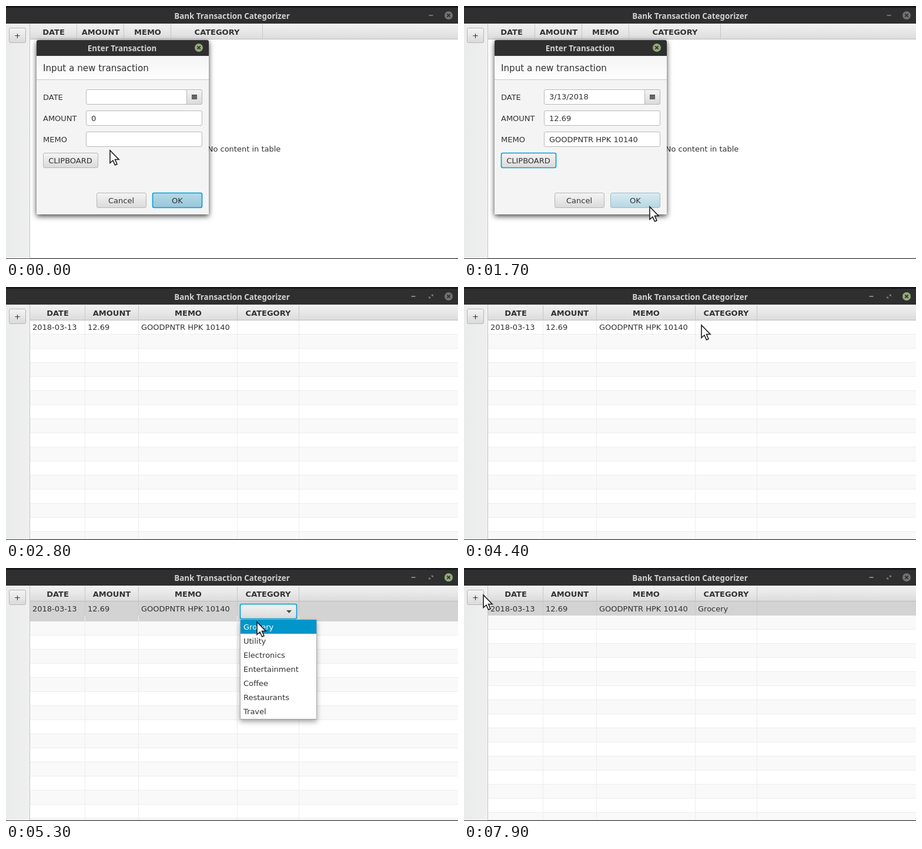
Recreate the animation shown at these times as an HTML page. Size 769 by 431 pixels, loop 8000 ms.

```html
<!DOCTYPE html>
<html lang="en">
<head>
<meta charset="utf-8">
<title>Bank Transaction Categorizer</title>
<style>
  html, body { margin: 0; width: 100%; height: 100%; overflow: hidden; background: #fff; }
  svg { display: block; width: 769px; height: 431px; font: 13px "DejaVu Sans", sans-serif; }
  text { fill: #323232; white-space: pre; }
  .mid { text-anchor: middle; }
  .head text { font-weight: bold; text-anchor: middle; }
  .title { font: bold 13.33px "Noto Sans", sans-serif; fill: #d2d2d2; text-anchor: middle; }
  .box { fill: #fff; stroke: #b9b9b9; }
  .btn { fill: url(#btn); stroke: #b6b6b6; }
  .ring { fill: none; stroke: #039ed3; stroke-width: 1.6; }
  .lines { stroke: #ededed; fill: none; }

  /* Every change is a hard cut; 1.25% is 100 ms. */
  .t { animation: 8s step-end -1ms infinite; }
  .before { animation-name: before; }
  .after { animation-name: after; }
  .empty { animation-name: empty; }
  .filled { animation-name: filled; }
  .clipFocus { animation-name: clipFocus; }
  .okFocus { animation-name: okFocus; }
  .active { animation-name: active; }
  .grid { animation-name: grid; }
  .row { animation-name: row; }
  .cells { animation-name: cells; }
  .cells text { fill: currentColor; }
  .focus { animation-name: focus; }
  .chosen { animation-name: chosen; }
  .combo { animation-name: combo; }
  .comboFocus { animation-name: comboFocus; }
  .popup { animation-name: popup; }
  .cursor { animation-name: cursor; }

  @keyframes before { 0% { opacity: 1 } 26.25%, 100% { opacity: 0 } }
  @keyframes after { 0% { opacity: 0 } 26.25%, 100% { opacity: 1 } }
  @keyframes empty { 0% { opacity: 1 } 8.75%, 100% { opacity: 0 } }
  @keyframes filled { 0% { opacity: 0 } 8.75%, 100% { opacity: 1 } }
  @keyframes clipFocus { 0%, 22.5%, 100% { opacity: 0 } 8.75% { opacity: 1 } }
  @keyframes okFocus { 0%, 22.5%, 100% { opacity: 1 } 8.75% { opacity: 0 } }
  @keyframes active { 0%, 86.25%, 100% { opacity: 0 } 51.25% { opacity: 1 } }
  @keyframes focus { 0%, 61.25%, 86.25%, 100% { opacity: 0 } 56.25%, 67.5% { opacity: 1 } }
  @keyframes chosen { 0% { opacity: 0 } 67.5%, 100% { opacity: 1 } }
  @keyframes combo { 0%, 67.5%, 100% { opacity: 0 } 58.75% { opacity: 1 } }
  @keyframes comboFocus { 0% { opacity: 0 } 61.25%, 100% { opacity: 1 } }
  @keyframes popup { 0%, 67.5%, 100% { opacity: 0 } 62.5% { opacity: 1 } }
  @keyframes grid {
    0%, 67.5%, 100% { transform: translateY(0) }
    58.75% { transform: translateY(10px) }
  }
  @keyframes row {
    0% { fill: #fff; height: 23px }
    56.25% { fill: #0096c9; height: 24px }
    58.75% { fill: #0096c9; height: 34px }
    61.25% { fill: #d3d3d3; height: 34px }
    67.5% { fill: #0096c9; height: 24px }
    86.25%, 100% { fill: #d3d3d3; height: 24px }
  }
  @keyframes cells {
    0% { color: #323232; transform: translateY(0) }
    56.25%, 67.5% { color: #fff; transform: translateY(1px) }
    61.25%, 86.25%, 100% { color: #323232; transform: translateY(1px) }
  }
  @keyframes cursor {
    0% { transform: translate(176px, 245px) }
    1.25% { transform: translate(148px, 256px) }
    2.5% { transform: translate(96px, 280px) }
    3.75% { transform: translate(72px, 271px) }
    10% { transform: translate(78px, 272px) }
    11.25% { transform: translate(104px, 277px) }
    12.5% { transform: translate(152px, 288px) }
    13.75% { transform: translate(212px, 305px) }
    15% { transform: translate(268px, 322px) }
    16.25% { transform: translate(310px, 335px) }
    17.5% { transform: translate(331px, 340px) }
    18.75% { transform: translate(336px, 341px) }
    21.25% { transform: translate(315px, 341px) }
    27.5% { transform: translate(313px, 340px) }
    28.75% { transform: translate(307px, 338px) }
    30% { transform: translate(302px, 336px) }
    32.5% { transform: translate(190px, 220px) }
    33.75% { transform: translate(15px, 47px) }
    35% { transform: translate(-40px, 60px) }
    41.25% { transform: translate(8px, 74px) }
    42.5% { transform: translate(189px, 70px) }
    46.25% { transform: translate(330px, 55px) }
    47.5% { transform: translate(404px, 63px) }
    51.25% { transform: translate(403px, 64px) }
    61.25% { transform: translate(412px, 69px) }
    63.75% { transform: translate(419px, 76px) }
    65% { transform: translate(424px, 86px) }
    66.25% { transform: translate(426px, 91px) }
    71.25% { transform: translate(120px, 120px) }
    72.5% { transform: translate(-40px, 124px) }
    93.75% { transform: translate(0, 27px) }
    95% { transform: translate(35px, 42px) }
    97.5% { transform: translate(33px, 43px) }
    98.75%, 100% { transform: translate(32px, 45px) }
  }
</style>
</head>
<body>
<svg viewBox="0 0 769 431">
  <defs>
    <linearGradient id="btn" x2="0" y2="1"><stop stop-color="#f4f4f4"/><stop offset="1" stop-color="#dadada"/></linearGradient>
    <linearGradient id="headFill" x2="0" y2="1"><stop stop-color="#f3f3f3"/><stop offset="1" stop-color="#dcdcdc"/></linearGradient>
    <linearGradient id="side"><stop stop-color="#eaeceb"/><stop offset="1" stop-color="#efefef"/></linearGradient>
    <linearGradient id="panel" x2="0" y2="1"><stop stop-color="#f4f4f4"/><stop offset="1" stop-color="#fefefe"/></linearGradient>
    <linearGradient id="okPale" x2="0" y2="1"><stop stop-color="#d9ecf3"/><stop offset="1" stop-color="#b7d6e2"/></linearGradient>
    <linearGradient id="okBlue" x2="0" y2="1"><stop stop-color="#b4dae9"/><stop offset="1" stop-color="#98c6da"/></linearGradient>
    <pattern id="stripes" y="81" width="769" height="48" patternUnits="userSpaceOnUse">
      <path fill="#fff" d="M0 0h769v48H0z"/>
      <path fill="#f9f9f9" d="M0 0h769v24H0z"/>
      <path fill="#ededed" d="M0 23h769v1H0zM0 47h769v1H0z"/>
    </pattern>
    <filter id="shadow" x="-20%" y="-20%" width="140%" height="140%">
      <feDropShadow dx="0" dy="3" stdDeviation="5" flood-opacity=".75"/>
    </filter>
    <filter id="soft" x="-20%" y="-20%" width="140%" height="140%">
      <feDropShadow dx="0" dy="4" stdDeviation="4" flood-opacity=".35"/>
    </filter>
    <g id="close">
      <circle r="7"/>
      <path d="M-2.7-2.7l5.4 5.4m0-5.4l-5.4 5.4" stroke="#2f2f2f" stroke-width="1.7"/>
    </g>
  </defs>

  <!-- window -->
  <path fill="#17181d" d="M0 0h769v4H0z"/>
  <path fill="#2f2f2f" d="M0 3h769v27H0z"/>
  <text class="title" x="384.5" y="22">Bank Transaction Categorizer</text>
  <use href="#close" x="753" y="16" fill="#727272"/>
  <use class="t active" href="#close" x="753" y="16" fill="#93ab7a"/>
  <path fill="url(#side)" d="M0 30h40v400H0z"/>
  <rect class="btn" x="5.5" y="37.5" width="28" height="25" rx="2.5"/>
  <text class="mid" x="19.5" y="55">+</text>
  <path fill="#fff" d="M40 30h729v400H40z"/>
  <path fill="url(#headFill)" d="M41 30h728v26H41z"/>
  <path fill="#bcbcbc" d="M41 56h728v1H41z"/>

  <!-- empty table -->
  <g class="t before">
    <path d="M719.5 16h7" stroke="#858585" stroke-width="1.6"/>
    <path d="M120.5 31v25M200.5 31v25M280.5 31v25M436.5 31v25" stroke="#c6c6c6"/>
    <g class="head">
      <text x="81" y="49">DATE</text>
      <text x="161" y="49">AMOUNT</text>
      <text x="241" y="49">MEMO</text>
      <text x="359" y="49">CATEGORY</text>
    </g>
    <text class="mid" x="405" y="248">No content in table</text>
  </g>

  <!-- table with the entry -->
  <g class="t after">
    <path d="M689.5 16h7" stroke="#9a9a9a" stroke-width="1.6"/>
    <path d="M723.5 13h3v3zM722.5 19h-3v-3zM724 15.500l2-2M722 16.500l-2 2" fill="#858585" stroke="#858585" stroke-width=".6"/>
    <path d="M134.500 31v25M225.500 31v25M393.500 31v25M498.500 31v25" stroke="#c6c6c6"/>
    <g class="head">
      <text x="88" y="49">DATE</text>
      <text x="180" y="49">AMOUNT</text>
      <text x="310" y="49">MEMO</text>
      <text x="446" y="49">CATEGORY</text>
    </g>
    <path class="lines" d="M41 80.500h728"/>
    <rect class="t grid" x="41" y="81" width="728" height="349" fill="url(#stripes)"/>
    <rect class="t row" x="41" y="57" width="728" height="23"/>
    <path class="lines" d="M134.500 81v349M225.500 81v349M393.500 81v349M498.500 81v349"/>
    <path d="M134.500 57v24M225.500 57v24M393.500 57v24M498.500 57v24" stroke="#aaa" stroke-opacity=".25"/>
    <g class="t focus">
      <rect x="42.500" y="58.500" width="725" height="21" fill="none" stroke="#58bbdd" stroke-opacity=".7"/>
    </g>
    <g class="t cells">
      <text x="45" y="73">2018-03-13</text>
      <text x="139" y="73">12.69</text>
      <text x="230" y="73">GOODPNTR HPK 10140</text>
      <text class="t chosen" x="398" y="73">Grocery</text>
    </g>
  </g>

  <!-- table frame -->
  <path d="M40.500 30v400M40 429.500h729" stroke="#c4c4c4"/>
  <path class="t focus" d="M40.500 30.500h728v399h-728z" fill="none" stroke="#039ed3"/>
  <path fill="#34363b" d="M0 430h769v1H0z"/>

  <!-- category picker -->
  <g class="t combo">
    <rect class="btn" x="398.500" y="61.500" width="96" height="25" rx="2.500"/>
    <rect class="ring t comboFocus" x="398.500" y="61.500" width="96" height="25" rx="2.500"/>
    <path fill="#4b4b4b" d="M477 72h9l-4.500 5z"/>
  </g>
  <g class="t popup">
    <path d="M398.500 88.500h130v169h-130z" fill="#fff" stroke="#aaa" filter="url(#soft)"/>
    <path fill="#0096c9" d="M399 88h129v24H399z"/>
    <text x="404" y="105" style="fill:#fff">Grocery</text>
    <text x="404" y="129">Utility</text>
    <text x="404" y="153">Electronics</text>
    <text x="404" y="177">Entertainment</text>
    <text x="404" y="201">Coffee</text>
    <text x="404" y="225">Restaurants</text>
    <text x="404" y="249">Travel</text>
  </g>

  <!-- entry dialog -->
  <g class="t before">
    <path d="M52 355V61q0-3 3-3h287q3 0 3 3v294z" fill="#f4f4f4" filter="url(#shadow)"/>
    <path d="M52 85V61q0-3 3-3h287q3 0 3 3v24z" fill="#2f2f2f"/>
    <text class="title" x="197.500" y="77">Enter Transaction</text>
    <use href="#close" x="328" y="71" fill="#93ab7a"/>
    <path fill="url(#panel)" d="M52 85h293v40H52z"/>
    <path fill="#c6c6c6" d="M52 125h293v1H52z"/>
    <text x="63" y="111" font-size="15.170">Input a new transaction</text>
    <text x="63" y="160">DATE</text>
    <text x="63" y="196">AMOUNT</text>
    <text x="63" y="232">MEMO</text>

    <rect class="box" x="136.500" y="142.500" width="197" height="25" rx="2.500"/>
    <path class="btn" d="M307.500 142.500h23.500q2.500 0 2.500 2.500v20q0 2.500-2.500 2.500h-23.500z"/>
    <path fill="#505050" d="M316 151h9v8h-9z"/>
    <path d="M317 153.500h7M317 155.500h7M317 157.500h7" stroke="#bbb" stroke-width=".8" stroke-dasharray="1 1"/>
    <rect class="box" x="136.500" y="178.500" width="197" height="25" rx="2.500"/>
    <rect class="box" x="136.500" y="214.500" width="197" height="25" rx="2.500"/>
    <text class="t empty" x="145" y="196">0</text>
    <g class="t filled">
      <text x="145" y="159">3/13/2018</text>
      <text x="145" y="196">12.69</text>
      <text x="145" y="232">GOODPNTR HPK 10140</text>
    </g>

    <rect class="btn" x="63.500" y="250.500" width="93" height="25" rx="2.500"/>
    <rect class="ring t clipFocus" x="63.500" y="250.500" width="93" height="25" rx="2.500"/>
    <text class="mid" x="109.500" y="268">CLIPBOARD</text>
    <rect class="btn" x="154.500" y="318.500" width="84" height="25" rx="2.500"/>
    <text class="mid" x="196" y="336">Cancel</text>
    <rect x="249.500" y="318.500" width="84" height="25" rx="2.500" fill="url(#okPale)" stroke="#9dbac6"/>
    <g class="t okFocus">
      <rect x="249.500" y="318.500" width="84" height="25" rx="2.500" fill="url(#okBlue)"/>
      <rect class="ring" x="249.500" y="318.500" width="84" height="25" rx="2.500"/>
    </g>
    <text class="mid" x="291.500" y="336">OK</text>
  </g>

  <path class="t cursor" d="M1 1v21.500l5-4.500 3.500 8 3.500-1.500-3.500-8h6.500z" fill="#fff" stroke="#1c1c1c" stroke-width="1.600"/>
</svg>
</body>
</html>
```
